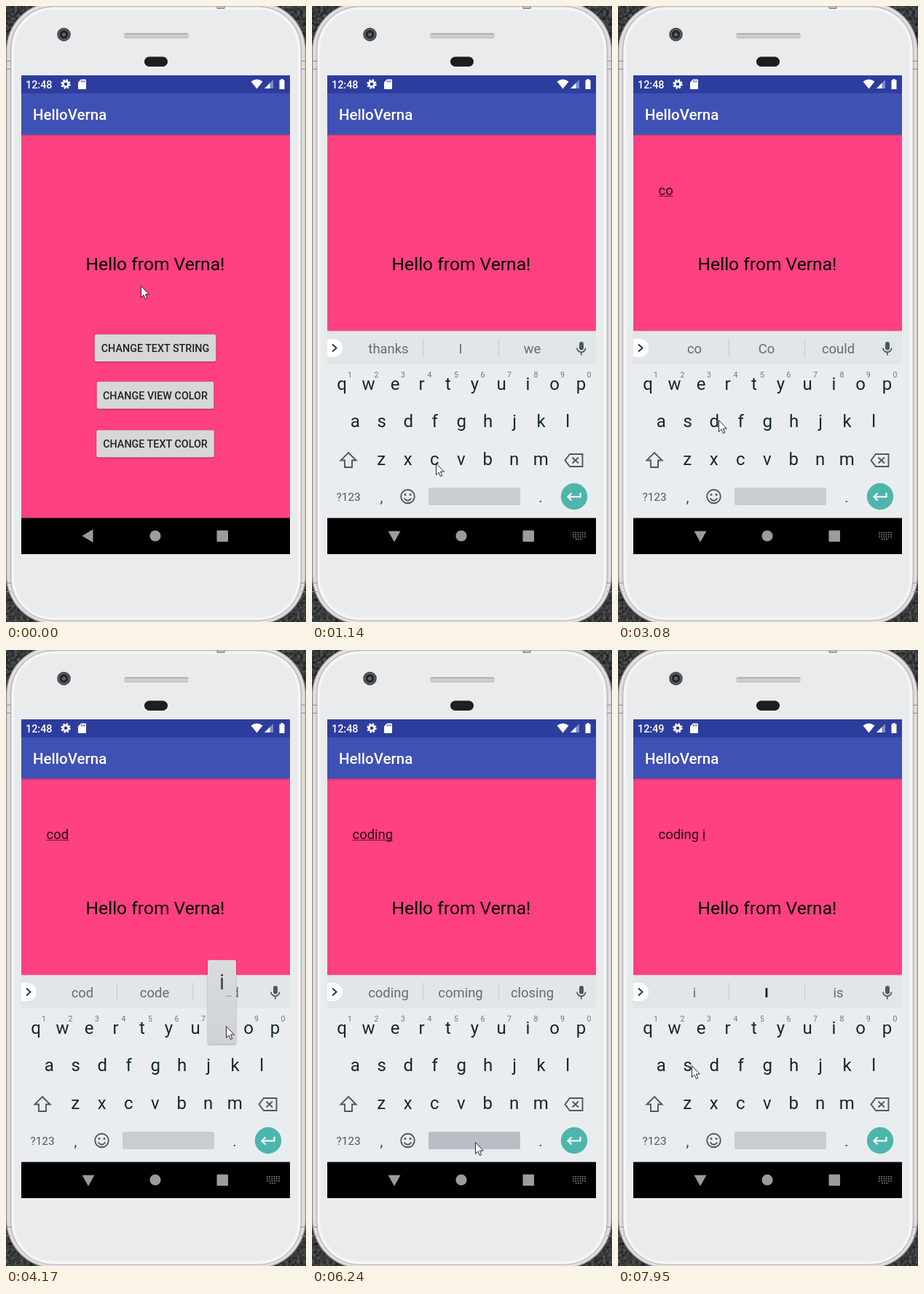
Recreate the animation shown at these times as an HTML page. Size 412 by 844 pixels, loop 8000 ms.

```html
<!DOCTYPE html>
<html lang="en">
<head>
<meta charset="utf-8">
<title>HelloVerna</title>
<style>
html, body { margin: 0; width: 100%; height: 100%; overflow: hidden; background: #3c3e40; }
svg { display: block; width: 100vw; height: 100vh; }
text { font-family: Roboto, "Open Sans", sans-serif; white-space: pre; }
.mid { text-anchor: middle; }
.clock { font-size: 14.4px; font-weight: 500; fill: #fff; }
.title { font-size: 20.5px; font-weight: 500; fill: #fff; }
.hello { font-size: 24.6px; fill: #0a0204; }
.field { font-size: 18.45px; fill: #2a0a15; }
.btn { font-size: 14.35px; font-weight: 500; fill: #222; }
.word { font-size: 18.45px; fill: #646d70; }
.word.strong { font-weight: 700; fill: #0b1418; }
.key { font-size: 24px; fill: #14272f; }
.hint { font-size: 10.5px; fill: #6c777b; }
.sym { font-size: 15.4px; fill: #4b5a60; }
.mark { font-size: 20px; fill: #37474f; }
.big { font-size: 29px; fill: #37474f; }
.icon { fill: none; stroke: #4b5a60; stroke-width: 1.9; }
.nav { fill: #9c9c9c; }
</style>
</head>
<body>
<svg viewBox="0 0 412 844" preserveAspectRatio="none">
  <defs>
    <filter id="stone" x="0" y="0" width="1" height="1" color-interpolation-filters="sRGB">
      <feTurbulence type="fractalNoise" baseFrequency=".25" numOctaves="2" seed="4"/>
      <feColorMatrix values=".4 0 0 0 .02  .4 0 0 0 .03  .4 0 0 0 .03  0 0 0 0 1"/>
    </filter>
    <filter id="drop" x="-20%" y="-20%" width="140%" height="150%" color-interpolation-filters="sRGB">
      <feDropShadow dx="0" dy="1" stdDeviation=".9" flood-opacity=".3"/>
    </filter>
    <linearGradient id="shade" x2="0" y2="1">
      <stop stop-opacity=".14"/><stop offset="1" stop-opacity="0"/>
    </linearGradient>
    <linearGradient id="slot" x2="0" y2="1">
      <stop stop-color="#a9a9ab"/><stop offset=".5" stop-color="#d4d4d6"/><stop offset="1" stop-color="#bdbdbf"/>
    </linearGradient>
    <linearGradient id="tip" x2="0" y2="1">
      <stop stop-color="#d9dcdd"/><stop offset="1" stop-color="#d0d3d5"/>
    </linearGradient>
  </defs>

  <!-- phone body -->
  <rect width="412" height="844" fill="#3c3e40" filter="url(#stone)"/>
  <rect x=".5" y="-5" width="411" height="852" rx="66" fill="#d6d0d3" stroke="#8c8589"/>
  <rect x="3.5" y="-1.5" width="405" height="845" rx="62" fill="none" stroke="#e6e1e4" stroke-width="2"/>
  <rect x="7" y="1" width="398" height="841" rx="58" fill="#e9ebec" stroke="#aaa3a7"/>
  <rect x="9.5" y="3.5" width="393" height="836" rx="56" fill="none" stroke="#f4f5f5" stroke-width="4"/>
  <path d="M0 75.500H7M0 86.500H7M405 75.500H412M405 86.500H412M0 790.500H7M0 802.500H7M405 790.500H412M405 802.500H412" stroke="#938c90"/>
  <path d="M290 0V3.500H300V0" fill="#bdb6ba" stroke="#857e82"/>
  <circle cx="79.500" cy="39" r="9.300" fill="#4c4c4e"/>
  <circle cx="79.500" cy="39" r="6.500" fill="#252629" stroke="#77777a"/>
  <circle cx="79.500" cy="39" r="2.600" fill="#5c6570"/>
  <rect x="162" y="37" width="89" height="7.500" rx="3.500" fill="url(#slot)"/>
  <rect x="190" y="69.500" width="32" height="13.500" rx="6.700" fill="#1d1e20"/>

  <!-- app -->
  <rect x="21" y="176" width="369" height="526" fill="#ff4081"/>
  <rect x="21" y="176" width="369" height="3" fill="url(#shade)"/>
  <rect x="21" y="95" width="369" height="25" fill="#2d3d9d"/>
  <rect x="21" y="119.500" width="369" height="57" fill="#4051b5"/>
  <text class="clock" id="clock" x="27" y="112.500">12:48</text>
  <g fill="none" stroke="#fff">
    <circle cx="82" cy="107" r="3.700" stroke-width="2.800"/>
    <circle cx="82" cy="107" r="5.600" stroke-width="2.200" stroke-dasharray="2.400 1.998"/>
  </g>
  <path d="M103 100.500H109Q110 100.500 110 101.500V113Q110 114 109 114H100Q99 114 99 113V104.500Z" fill="#fff"/>
  <path d="M103.500 102V104.500M105.700 102V104.500M107.900 102V104.500" stroke="#2d3d9d"/>
  <path d="M336.500 103.500Q344.500 97.500 352.500 103.500L344.500 113.500Z" fill="#fff"/>
  <path d="M367 101V113H355Z" fill="#fff" opacity=".4"/>
  <path d="M362.500 105.500V113H355Z" fill="#fff"/>
  <path d="M377.500 100H380.500V101.500H382.500V114H375.500V101.500H377.500Z" fill="#fff"/>
  <text class="title" x="37" y="156">HelloVerna</text>
  <text class="field" x="55.500" y="258.500"><tspan id="done"></tspan><tspan id="live"></tspan></text>
  <rect id="line" y="260" height="1" fill="#2a0a15" opacity=".75"/>
  <text class="hello mid" x="205" y="362">Hello from Verna!</text>
  <g id="buttons"></g>

  <!-- keyboard -->
  <g id="board">
    <rect x="21" y="445.500" width="369" height="256.500" fill="#e9edef"/>
    <rect x="21" y="445.500" width="369" height="45.500" fill="#e1e6e8"/>
    <path d="M21 456H29.500A12.500 12.500 0 0 1 29.500 481H21Z" fill="#fff"/>
    <path class="icon" d="M28 463.500L33.500 468.500L28 473.500" style="stroke:#263238"/>
    <path d="M152.500 456V481M256.500 456V481" stroke="#c3cacd"/>
    <g id="words"></g>
    <rect x="367" y="460" width="6" height="11.500" rx="3" fill="#4b5a60"/>
    <path class="icon" d="M364 468.500A5.800 5.800 0 0 0 375.600 468.500M369.800 474V478.500" style="stroke-width:1.700"/>
    <g id="keys"></g>
    <path class="icon" d="M50 612L60.500 622.500H55V632H45V622.500H39.500Z"/>
    <path class="icon" d="M354 614H371.500V631H354L347.500 622.500Z M357.500 618.500L366 626.500M366 618.500L357.500 626.500"/>
    <text class="sym mid" x="50" y="678">?123</text>
    <text class="mark mid" x="95.500" y="680">,</text>
    <text class="mark mid" x="314" y="680">.</text>
    <circle class="icon" cx="131.500" cy="672" r="9.300"/>
    <path class="icon" d="M126.500 674.500Q131.500 681 136.500 674.500"/>
    <circle cx="128" cy="669.500" r="1.500" fill="#4b5a60"/>
    <circle cx="135" cy="669.500" r="1.500" fill="#4b5a60"/>
    <rect id="space" x="160" y="660" width="126" height="24" rx="2.500" fill="#c9cdd0"/>
    <circle cx="360" cy="672" r="18.200" fill="#4db6ac"/>
    <path d="M368.500 667V672.500H352M356.500 667.500L351.500 672.500L356.500 677.500" fill="none" stroke="#fff" stroke-width="2.200"/>
  </g>

  <!-- navigation bar -->
  <rect x="21" y="701.500" width="369" height="49.500"/>
  <path class="nav" id="back" d="M119.500 717V735L104.500 726Z"/>
  <g class="nav" id="hide">
    <path d="M104.500 719.500H121.500L113 734.500Z"/>
    <path d="M358 721.500H376M358 724.500H376M358 727.500H376M362 730.500H372" stroke="#858585" stroke-width="1.600" stroke-dasharray="1.800 1.420"/>
  </g>
  <circle class="nav" cx="205" cy="726" r="7.600"/>
  <rect class="nav" x="289.500" y="718.500" width="15.500" height="15.500" rx="1"/>

  <g id="popup">
    <rect x="-19.500" y="-93" width="39" height="115" rx="2.500" fill="url(#tip)" filter="url(#drop)"/>
    <text class="big mid" id="letter" y="-53"></text>
    <text class="mid" x="9.500" y="-43" font-size="12" fill="#55636a">…</text>
  </g>
  <path id="arrow" d="M.5 .7V16.300L4 13L6.500 18.500L8.800 17.500L6.400 12H11.300Z" fill="#fff" stroke="#111" stroke-width=".9"/>
</svg>

<script>
const $ = id => document.getElementById(id);

function add(parent, tag, attrs, text = '') {
  const el = document.createElementNS('http://www.w3.org/2000/svg', tag);
  for (const k in attrs) el.setAttribute(k, attrs[k]);
  el.textContent = text;
  $(parent).append(el);
  return el;
}

[['CHANGE TEXT STRING', 450, 166.5], ['CHANGE VIEW COLOR', 514.7, 160.5], ['CHANGE TEXT COLOR', 581.2, 161.5]]
  .forEach(([label, y, w]) => {
    add('buttons', 'rect', { x: 205 - w / 2, y, width: w, height: 37, rx: 2, fill: '#d6d7d7', filter: 'url(#drop)' });
    add('buttons', 'text', { class: 'btn mid', x: 205, y: y + 24 }, label);
  });

const keyPos = {};
[['qwertyuiop', 41], ['asdfghjkl', 59.2], ['zxcvbnm', 95.2]].forEach(([row, x0], r) => {
  [...row].forEach((ch, i) => {
    const x = x0 + i * 36.5, y = 525.7 + r * 51.6;
    keyPos[ch] = [x, y - 8];
    add('keys', 'text', { class: 'key mid', x, y }, ch);
    if (!r) add('keys', 'text', { class: 'hint mid', x: x + 11, y: 508.5 }, (i + 1) % 10);
  });
});

const words = [105, 204, 302.5].map(x => add('words', 'text', { class: 'word mid', x, y: 476 }));

const LOOP = 8000;

// screen refreshes: start, end, count
const bursts = [
  [0, 0, 1], [120, 120, 1], [240, 1140, 8], [1540, 2230, 6], [2500, 3080, 5], [3350, 4170, 6],
  [4300, 4300, 1], [4440, 5370, 8], [5520, 5970, 4], [6240, 6240, 1], [6360, 7260, 8], [7410, 7950, 5]
];

// pointer stops: time, x, y
const path = [
  [0, 185, 383], [120, 185, 403], [240, 185, 431], [1140, 170, 626],
  [1670, 170, 626], [2230, 332, 521], [2640, 332, 521], [3080, 138, 567],
  [3510, 138, 567], [4170, 302, 515], [4440, 302, 515], [4830, 277, 627],
  [5100, 277, 627], [5370, 205, 572], [5660, 205, 572], [5970, 224, 674],
  [6360, 224, 674], [7260, 302, 516], [7540, 302, 516], [7950, 101, 569]
];

// key presses: key, down, up
const presses = [
  ['c', 1530, 1800], ['o', 2490, 2780], ['d', 3340, 3670], ['i', 4160, 4435],
  ['n', 4830, 5100], ['g', 5510, 5660], [' ', 6230, 6480], ['i', 7400, 7670]
];

const guesses = [
  'thanks I we', 'c C can', 'co Co could', 'cod code cold', 'codi coding Codi',
  'codin coding Codin', 'coding coming closing', 'is and in', 'i I is'
];

function snap(t) {
  const [a, b, n] = bursts.findLast(s => s[0] <= t);
  if (n === 1) return a;
  const step = (b - a) / (n - 1);
  return a + step * Math.min(n - 1, Math.floor((t - a) / step + 0.01));
}

function pointer(t) {
  const i = path.findLastIndex(p => p[0] <= t);
  const [t0, x0, y0] = path[i], [t1, x1, y1] = path[i + 1] || [LOOP, x0, y0];
  let k = (t - t0) / (t1 - t0);
  k = t0 < 240 ? k : k * k * (3 - 2 * k);
  return [x0 + (x1 - x0) * k, y0 + (y1 - y0) * k];
}

const show = (id, on) => $(id).style.display = on ? '' : 'none';
let last = -1;

function draw(time) {
  const t = snap(time);
  if (t === last) return;
  last = t;

  const open = t >= 120;
  show('board', open);
  show('hide', open);
  show('back', !open);
  $('board').setAttribute('opacity', t < 240 ? 0.6 : t < 360 ? 0.985 : 1);
  $('board').setAttribute('transform', `translate(0 ${t < 240 ? 10 : t < 360 ? 0.7 : 0})`);

  const typed = presses.filter(p => p[2] <= t).map(p => p[0]).join('');
  const cut = typed.indexOf(' ') + 1;
  $('done').textContent = typed.slice(0, cut);
  $('live').textContent = typed.slice(cut);
  const w0 = $('done').getComputedTextLength(), w1 = $('live').getComputedTextLength();
  $('line').setAttribute('x', 55.5 + w0);
  $('line').setAttribute('width', w1);
  guesses[typed.length].split(' ').forEach((w, i) => words[i].textContent = w);
  words[1].classList.toggle('strong', typed.length === 8);
  $('clock').textContent = t < 7670 ? '12:48' : '12:49';

  const held = presses.find(p => p[1] <= t && t < p[2])?.[0];
  const pos = keyPos[held];
  show('popup', pos);
  if (pos) {
    $('popup').setAttribute('transform', `translate(${pos})`);
    $('letter').textContent = held;
  }
  $('space').setAttribute('fill', held === ' ' ? '#b9bdc5' : '#c9cdd0');
  $('arrow').setAttribute('transform', `translate(${pointer(t)})`);
}

const begin = performance.now();
function tick() {
  draw((performance.now() - begin) % LOOP);
  requestAnimationFrame(tick);
}
tick();
</script>
</body>
</html>
```
